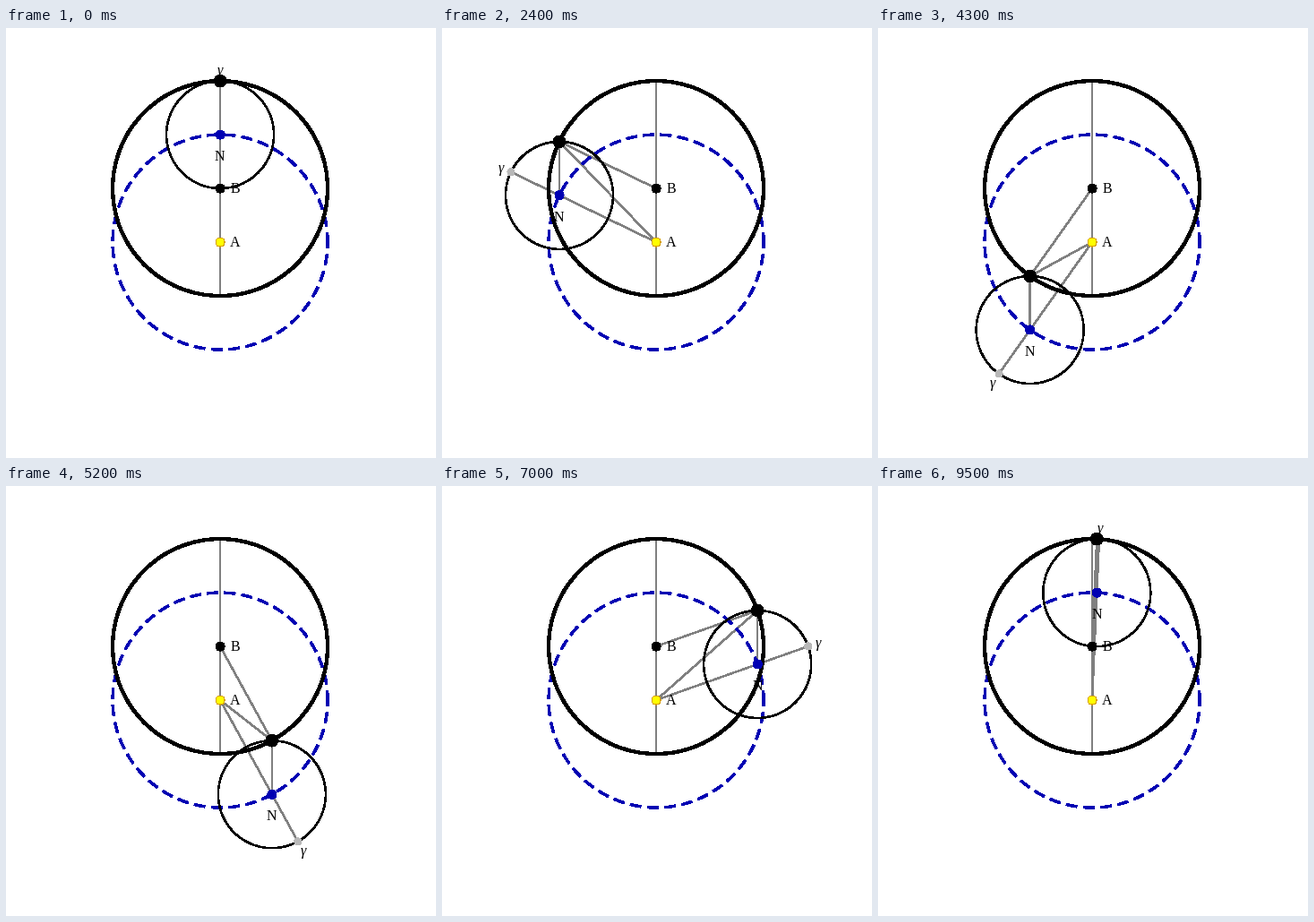
Animation of 480 by 480 pixels, one loop 9.6 s. Source, as a matplotlib script:

```python
import numpy as np
import matplotlib.pyplot as plt
from matplotlib.animation import FuncAnimation
from matplotlib.patches import Annulus, Circle, Polygon, Wedge

SIZE, DPI = 480, 100
FRAMES, INTERVAL = 96, 100
PX = 72 / DPI                      # one pixel in points
R, ECC = 120, 0.5                  # deferent radius, eccentricity
A = np.array([239.05, 239.05])
B = A - [0, ECC * R]
GRAY, BLUE = "#808080", "#0000b3"
THIN = 1.5

fig = plt.figure(figsize=(SIZE / DPI, SIZE / DPI), dpi=DPI, facecolor="white")
ax = fig.add_axes([0, 0, 1, 1])
ax.set_xlim(0, SIZE)
ax.set_ylim(SIZE, 0)
ax.axis("off")


def add(patch, color, z):
    """Add a crisp filled shape."""
    patch.set(facecolor=color, edgecolor="none", linewidth=0, zorder=z,
              antialiased=False, snap=False)
    return ax.add_patch(patch)


def dot(pos, radius, color, z):
    return add(Circle(pos, radius), color, z)


def ring(pos, radius, width, z):
    return add(Annulus(pos, radius + width / 2, width), "black", z)


def dashed_ring(pos, radius, width, on, period, z):
    step = np.degrees(1 / radius)
    for s in np.arange(0, 2 * np.pi * radius, period):
        start, end = (s - on / 2) * step, (s + on / 2) * step
        mid = period / 4 * step
        add(Wedge(pos, radius + width / 2, -end - mid, -start - mid,
                  width=width), BLUE, z)


def bar(p, q, width=THIN):
    """Corners of a straight bar from p to q."""
    along = (q - p) / np.hypot(*(q - p))
    side = np.array([-along[1], along[0]]) * width / 2
    return [p + side, q + side, q - side, p - side]


def label(text, pos, **kw):
    return ax.text(*pos, text, family="Liberation Serif", size=16 * PX,
                   ha="center", va="center", color="black", zorder=9, **kw)


def anomaly(mean):
    """Solve mean = e + ECC * sin(e) by damped Newton steps."""
    e = mean
    for _ in range(60):
        e -= 0.8 * (e + ECC * np.sin(e) - mean) / (1 + ECC * np.cos(e))
    return e


# Fixed parts
add(Polygon(bar(B - [0, R], B + [0, R])), GRAY, 1)
dashed_ring(A, R, 2.4, 12, 19.2, 2)
ring(B, R, 3.3, 3)
dot(B, 5, "black", 6)
dot(A, 5, "#d6a000", 6)
dot(A, 3.8, "#ffff00", 6.1)
label("A", A + [17, 1.2])
label("B", B + [17, 1.2])

# Moving parts
rods = [add(Polygon(bar(A, B)), GRAY, 1) for _ in range(4)]
epicycle = ring(A, ECC * R, THIN, 4)
apogee = dot(A, 4, "#b8b8b8", 6)
node = dot(A, 5, BLUE, 7)
planet = dot(A, 6.8, "black", 8)
node_text = label("N", A)
apogee_text = label("γ", A, style="italic")


def update(i):
    e = anomaly(2 * np.pi * i / FRAMES)
    out = np.array([-np.sin(e), -np.cos(e)])
    n, p = A + R * out, B + R * out
    g = n + ECC * R * out
    for rod, ends in zip(rods, [(A, g), (A, p), (B, p), (n, p)]):
        rod.set_xy(bar(*ends))
    for patch, pos in [(epicycle, n), (apogee, g), (node, n), (planet, p)]:
        patch.center = tuple(pos)
    node_text.set_position(n + [-0.2, 25])
    apogee_text.set_position(g + 12 * out + [0, 1])
    return [*rods, epicycle, apogee, node, planet, node_text, apogee_text]


anim = FuncAnimation(fig, update, frames=FRAMES, interval=INTERVAL,
                     repeat=True, repeat_delay=0)
plt.show()
```
